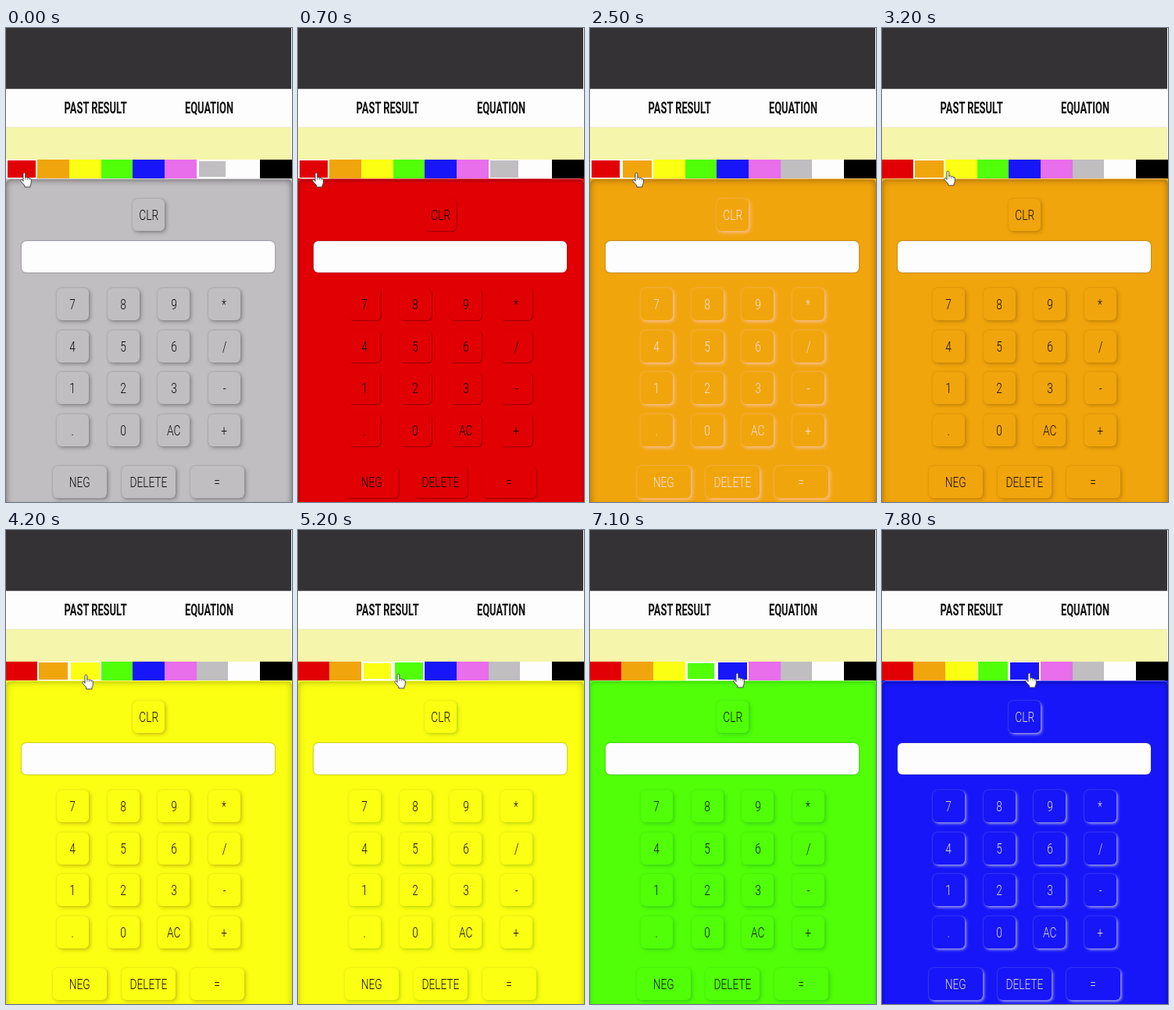
Recreate the animation shown at these times as an HTML page. Size 366 by 605 pixels, loop 8000 ms.

```html
<!DOCTYPE html>
<html lang="en">
<head>
<meta charset="utf-8">
<title>Calculator themes</title>
<style>
html, body { margin: 0; width: 100%; height: 100%; overflow: hidden; background: #fefdfe; }
#stage { position: relative; width: 366px; height: 605px; overflow: hidden; font-family: Roboto, sans-serif; }
#stage div, #hand { position: absolute; box-sizing: border-box; }
.head { left: 0; top: 0; width: 365px; height: 78px; background: #343234; border-bottom: 1px solid #6c6a6c; }
.strip { left: 0; top: 126px; width: 365px; height: 42px; background: #f5f5ab; border-top: 1px solid #eeeedc; }
.label { display: flex; align-items: center; justify-content: center; white-space: nowrap; font-size: 18.5px; font-weight: 300; }
.label span { transform: scaleX(.74); }
.label.title { font-size: 19.5px; font-weight: 600; color: #111; }
.title span { transform: scaleX(.66); }
#padBack { left: 0; top: 192px; width: 366px; height: 413px; }
#pad { left: 0; top: 192px; width: 366px; height: 419px; border-radius: 6px; border-top: 1px solid rgba(255,255,255,.4); }
.key { border-radius: 6px; }
.field { left: 20px; top: 272px; width: 324px; height: 40px; border-radius: 6px; background: #fefdfe; box-shadow: 0 0 1px 1px rgba(90,90,110,.3); }
.swatch { border: 0 solid #fefdfe; }
</style>
</head>
<body>
<div id="stage">
  <div class="head"></div>
  <div class="strip"></div>
  <div id="padBack"></div>
  <div id="pad"></div>
  <div class="field"></div>
</div>
<script>
const LOOP = 8000, FADE = 600, CELL = 366 / 9;
const stage = document.getElementById('stage');
const pad = document.getElementById('pad');
const padBack = document.getElementById('padBack');
const colors = ['#e10004', '#f1a50c', '#fbff12', '#50ff08', '#1616f8', '#e86eec', '#c0bec0', '#fefdfe', '#000'];

// Swatch, time of click, text, key shadow, inner edge, edge blur, blur at start of fade
const themes = [
  { swatch: 6, at: -5000, text: [10, 10, 10], shade: [0, 0, 0, .3], edge: '0,0,0,.45', blur: 9, from: 5 },
  { swatch: 0, at: 700, text: [248, 226, 226], shade: [255, 205, 215, .7], edge: '70,0,50,.5', blur: 5, from: 1 },
  { swatch: 1, at: 2500, text: [24, 14, 6], shade: [90, 50, 0, .28], edge: '80,45,10,.5', blur: 9, from: 5 },
  { swatch: 2, at: 4200, text: [16, 16, 6], shade: [70, 120, 0, .28], edge: '80,95,0,.42', blur: 8, from: 5 },
  { swatch: 3, at: 6000, text: [20, 24, 6], shade: [0, 110, 50, .26], edge: '0,110,20,.35', blur: 5, from: 1 },
  { swatch: 4, at: 7500, text: [250, 248, 236], shade: [235, 225, 255, .75], edge: '0,0,70,.5', blur: 6, from: 2 }
];

// Pointer path: time, x, y
const path = [
  [0, 18, 184], [1550, 18, 184], [1800, 35, 184], [2200, 54, 184], [3000, 54, 184],
  [3200, 79, 182], [3600, 95, 183], [3800, 97, 184], [5000, 97, 184], [5300, 136, 183],
  [5500, 140, 182], [6350, 140, 182], [7100, 183, 182], [8000, 183, 182]
];

function box(cls, x, y, w, h, text) {
  const el = document.createElement('div');
  el.className = cls;
  el.style.cssText = `left:${x}px;top:${y}px;width:${w}px;height:${h}px`;
  if (text) {
    const span = document.createElement('span');
    span.textContent = text;
    el.append(span);
  }
  stage.append(el);
  return el;
}

box('label title', 65, 90, 100, 24, 'PAST RESULT');
box('label title', 210, 90, 100, 24, 'EQUATION');

const swatches = colors.map((c, i) => {
  const x = Math.floor(i * CELL);
  const el = box('swatch', x, 168, Math.floor((i + 1) * CELL) - x, 24);
  el.style.backgroundColor = c;
  return el;
});

const keys = [];
const addKey = (x, y, w, text) => keys.push(box('label key', x, y, w, 41, text));
addKey(162, 218, 41, 'CLR');
['7', '8', '9', '*', '4', '5', '6', '/', '1', '2', '3', '-', '.', '0', 'AC', '+'].forEach((s, i) =>
  addKey(65 + (i % 4) * 64.6, Math.round(332 + (i >> 2) * 53.6), 41, s));
['NEG', 'DELETE', '='].forEach((s, i) => addKey(60 + i * 88, 559, 69, s));

stage.insertAdjacentHTML('beforeend', `<svg id="hand" width="17" height="21" viewBox="0 0 17 21">
  <path d="M4 11.5V2.4Q4 .8 5.4.8T6.8 2.4V7Q8.7 6 9.4 7.5 11.2 6.7 11.9 8.2 14.3 7.7 14.3 10V13.5Q14.3 15.2 13 17V19H5.8V17Q3 14.2 1 11.4.4 10 1.6 9.5T4 11.5Z" fill="#fff" stroke="#444" stroke-width="1"/>
  <path d="M6.8 7V10M9.4 7.8V10.2M11.9 8.5V10.5" stroke="#777" stroke-width=".8"/></svg>`);
const hand = document.getElementById('hand');

const mix = (a, b, k) => a + (b - a) * k;
const blend = (a, b, k) => a.map((v, i) => mix(v, b[i], k));

function pointer(t) {
  const i = Math.max(1, path.findIndex(p => p[0] > t));
  const a = path[i - 1], b = path[i];
  const k = (t - a[0]) / (b[0] - a[0]);
  return [mix(a[1], b[1], k), mix(a[2], b[2], k)];
}

function draw(t) {
  let n = 0;
  while (n + 1 < themes.length && themes[n + 1].at <= t) n++;
  const now = themes[n], old = themes[Math.max(0, n - 1)];
  const k = 1 - (1 - Math.min(1, (t - now.at) / FADE)) ** 3;
  const bg = colors[now.swatch];
  const text = `rgb(${blend(old.text, now.text, k).map(Math.round)})`;
  const [r, g, b, alpha] = blend(old.shade, now.shade, k);
  const blur = mix(now.from, now.shade[0] > 200 ? 4 : 5, k);
  const shade = `rgba(${Math.round(r)},${Math.round(g)},${Math.round(b)},`;
  const lift = mix(now.from > 2 ? 2 : 1, 2, k);
  const ring = alpha * mix(now.from > 2 ? .6 : .2, .6, k);
  const shadow = `${lift}px ${lift}px ${blur}px ${shade}${alpha}), 0 0 2px ${shade}${ring})`;

  padBack.style.background = bg;
  pad.style.boxShadow = `inset 0 1px ${now.blur}px rgba(${now.edge})`;
  for (const key of keys) {
    key.style.background = bg;
    key.style.color = text;
    key.style.boxShadow = shadow;
  }

  const [x, y] = pointer(t);
  hand.style.left = x + 'px';
  hand.style.top = y + 'px';
  const hover = Math.floor((x + 1.5) / CELL);
  swatches.forEach((el, i) => {
    let w = 0;
    if (i === hover) w = 2;
    else if (i === now.swatch) w = 3;
    else if (i === old.swatch) w = 3 * (1 - k);
    el.style.borderWidth = `${Math.max(0, w - 1)}px ${w}px`;
  });
}

const start = performance.now();
function tick() {
  draw((performance.now() - start) % LOOP);
  requestAnimationFrame(tick);
}
draw(0);
tick();
</script>
</body>
</html>
```
